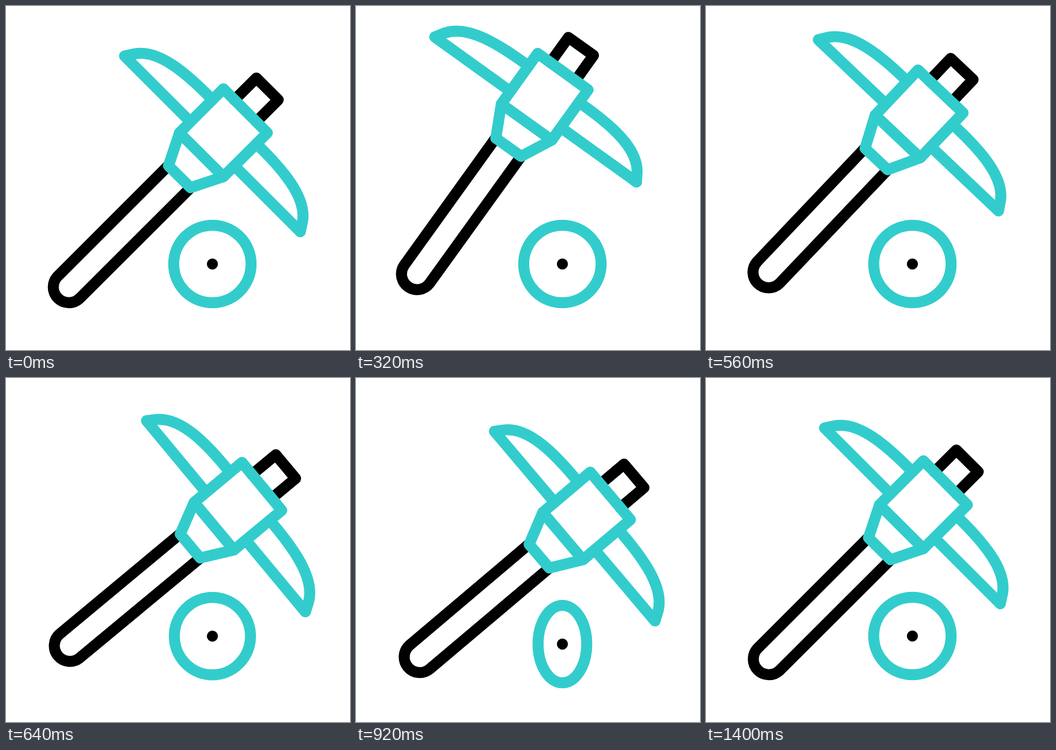
An HTML page for the animation above (1.52 s loop, 640 by 640 pixels).

```html
<!DOCTYPE html>
<html lang="en">
<head>
<meta charset="utf-8">
<title>Pickaxe and coin</title>
<style>
  html, body { margin: 0; width: 100%; height: 100%; overflow: hidden; background: #fff; }
  svg { display: block; width: 100vw; height: 100vh; }
  .line { fill: none; stroke-width: 20.5; stroke-linecap: round; stroke-linejoin: round; }
  .dark { stroke: #000; }
  .teal { stroke: #3cc; }
</style>
</head>
<body>
<svg viewBox="0 0 640 640">
  <defs>
    <path id="blade" d="M343 215.5 L220.5 93 L241 88.6 C285 82 335 124 384 174.5"/>
  </defs>
  <g id="pick">
    <g class="line dark">
      <path d="M302 297 L96 503 A29 29 0 0 0 137 544 L343.5 338"/>
      <path d="M425 174.7 L465.8 134 L506.5 174.5 L465.8 215.3"/>
    </g>
    <g class="line teal">
      <use href="#blade"/>
      <!-- mirrored across the handle's axis -->
      <use href="#blade" transform="matrix(0 -1 -1 0 640.5 640.5)"/>
      <path d="M404.5 154 L486.3 236 L404.5 317.5 L322.7 236 Z"/>
      <path d="M322.7 236 L302.3 297.3 L343.3 338 L404.5 317.5"/>
    </g>
  </g>
  <g id="coin">
    <ellipse id="rim" class="line teal" cx="384" cy="480" rx="72" ry="72"/>
    <circle cx="384" cy="480" r="10.3"/>
  </g>
</svg>
<script>
  const LOOP = 1520, STEP = 40, LAST = 1400;
  const $ = id => document.getElementById(id);
  const pick = $('pick'), coin = $('coin'), rim = $('rim');

  // Gentle start, quick middle, long soft landing.
  const ease = p => 1 - (1 - p ** 2.5) ** 5.7;
  const phase = (t, from, to) => ease(Math.min(1, Math.max(0, (t - from) / (to - from))));

  // Goes from 0 up to 1 at `peak` and back to 0 at `end`.
  const bump = (t, start, peak, end) => phase(t, start, peak) - phase(t, peak, end);

  function draw(time) {
    const t = Math.min(Math.floor(time % LOOP / STEP) * STEP, LAST);

    // Wind up, strike, settle.
    const angle = 7.95 * bump(t, 400, 800, 1120) - 9.35 * bump(t, 0, 400, 800);
    const lift = 28.4 * bump(t, 70, 480, 1200);
    pick.setAttribute('transform',
      `translate(${0.36 * angle} ${-lift}) rotate(${angle} 117 523)`);

    // The coin sinks and turns edge-on after the strike.
    coin.setAttribute('transform', `translate(0 ${15.2 * bump(t, 600, 1000, 1400)})`);
    rim.setAttribute('rx', 72 - 27 * bump(t, 600, 880, 1400));
  }

  const start = performance.now();
  function tick() {
    draw(performance.now() - start);
    requestAnimationFrame(tick);
  }
  tick();
</script>
</body>
</html>
```
